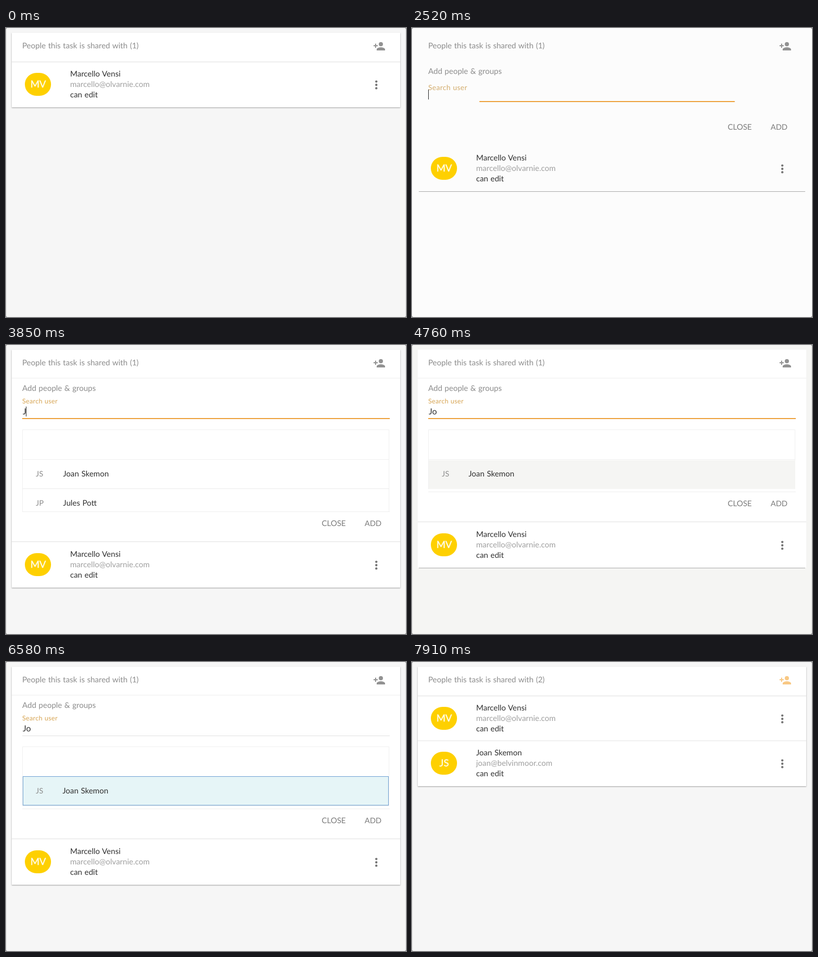
An HTML page for the animation above (8 s loop, 764 by 554 pixels).

```html
<!DOCTYPE html>
<html lang="en">
<head>
<meta charset="utf-8">
<title>Task sharing</title>
<style>
  html, body { margin: 0; width: 100%; height: 100%; overflow: hidden; background: #f6f6f6; }
  svg { display: block; width: 764px; height: 554px; }
  text { font-family: Lato, "Open Sans", sans-serif; word-spacing: .7px; white-space: pre; text-rendering: geometricPrecision; }
  .card { filter: drop-shadow(0 1px 1px rgba(0, 0, 0, .36)); }
</style>
</head>
<body>
<svg id="stage" viewBox="0 0 764 554" xmlns="http://www.w3.org/2000/svg"></svg>
<script>
const LOOP = 8000, STEP = 70;
const T = { hover: 1050, open: 1260, leave: 1610, focus: 2450, typeJ: 3780, results: 3850,
            typeO: 4060, filter: 4270, rowHover: 4690, select: 6090, added: 6720, hover2: 7910 };
const OWNER = { initials: 'MV', name: 'Marcello Vensi', mail: 'marcello@olvarnie.com' };
const GUEST = { initials: 'JS', name: 'Joan Skemon', mail: 'joan@belvinmoor.com' };
const OTHER = { initials: 'JP', name: 'Jules Pott' };
const DARK = '#303030', GREY = '#8c8c8c';
const PERSON = 'M15 12a4 4 0 1 0 0-8 4 4 0 0 0 0 8zM6 10V7H4v3H1v2h3v3h2v-3h3v-2zM15 14c-2.67 0-8 1.34-8 4v2h16v-2c0-2.66-5.33-4-8-4z';

const stage = document.getElementById('stage');
const clamp = v => Math.max(0, Math.min(1, v));
const mix = (a, b, k) => `rgb(${a.map((v, i) => Math.round(v + (b[i] - v) * k))})`;

// Cubic Bezier easing (.25, .8, .25, 1)
function ease(x) {
  let lo = 0, hi = 1;
  for (let i = 0; i < 24; i++) {
    const s = (lo + hi) / 2;
    if (.75 * s * (1 - s) + s ** 3 < x) lo = s; else hi = s;
  }
  const s = lo, r = 1 - s;
  return 2.4 * r * r * s + 3 * r * s * s + s ** 3;
}

const text = (x, y, str, fill = DARK, size = 15, extra = '') =>
  `<text x="${x}" y="${y}" fill="${fill}" font-size="${size}" ${extra}>${str}</text>`;
const rect = (x, y, w, h, fill, extra = '') =>
  `<rect x="${x}" y="${y}" width="${w}" height="${h}" fill="${fill}" ${extra}/>`;

function person(dy, { initials, name, mail }) {
  const dots = [102.6, 109, 115.4].map(y => `<circle cx="707.3" cy="${y}" r="2.2" fill="#747474"/>`).join('');
  return `<g transform="translate(0 ${dy})">` +
    rect(36, 86, 50, 44, '#fed000', 'rx="22"') +
    text(61.5, 114, initials, '#fffbe6', 18.5, 'text-anchor="middle" stroke="#fffbe6" stroke-width=".5"') +
    text(122.5, 93, name) + text(122.5, 113, mail, '#a0a0a0') + text(122.5, 133, 'can edit') +
    dots + '</g>';
}

function iconTint(t) {
  let k = 0;
  if (t >= T.hover2) k = 1;
  else if (t < T.leave) k = clamp((t - T.hover + STEP) / (2 * STEP));
  else k = clamp(1 - (t - T.leave + STEP) / (2 * STEP));
  return mix([146, 146, 146], [248, 200, 132], k);
}

function caret(t) {
  if (t < T.focus || t >= T.select) return '';
  const start = t >= T.typeO ? T.typeO : t >= T.typeJ ? T.typeJ : T.focus;
  if (Math.floor((t - start) / 490) % 2) return '';
  const x = t >= T.typeO ? 49 : t >= T.typeJ ? 38 : 31;
  return rect(x, 118, 1, 19, '#222');
}

function field(t) {
  const p = t < T.focus ? 0 : ease(clamp((t - T.focus + 22) / 400));
  const scale = 1 - .24 * p;
  const tint = p ? mix([205, 190, 165], [214, 163, 80], p) : '#cdcdcd';
  let out = `<g transform="translate(31 ${133 - 21 * p}) scale(${scale})">` +
    text(0, 0, 'Search user', tint, 16.5, 'style="letter-spacing:.4px"') + '</g>';
  if (t >= T.results) out += rect(31, 141, 702, 1, '#e0e0e0');
  if (p) {
    const x1 = 31 + 297 * (1 - p), x2 = 733 - 354 * (1 - p);
    const fade = 1 - clamp((t - T.select) / 350);
    out += rect(x1, 140, x2 - x1, 2, '#eda03a', `opacity="${fade}"`);
  }
  const typed = t >= T.typeO ? 'Jo' : t >= T.typeJ ? 'J' : '';
  return out + text(32, 133, typed, DARK, 16) + caret(t);
}

function results(t) {
  const one = t >= T.filter, end = one ? 276 : 319;
  let out = `<path d="M31.5 ${end}V162.5H731.5V${end}" fill="none" stroke="#efefef"/>` +
    rect(31, 219, 701, 1, '#efefef') + rect(31, 275, 701, 1, '#ebebeb') +
    rect(31, one ? 281 : 319, 702, 1, '#eeeeee');
  if (t >= T.select) out += rect(32.5, 219.5, 698, 55, '#e6f5f7', 'stroke="#6c9fd2"');
  else if (t >= T.rowHover) out += rect(32, 221, 700, 55, '#f5f5f3');
  const x = one ? 108 : 109;
  out += text(57, 252, GUEST.initials, GREY, 14.5) + text(x, 252, GUEST.name);
  if (!one) out += text(57, 308, OTHER.initials, GREY, 14.5) + text(x, 308, OTHER.name);
  return out;
}

function draw(t) {
  const open = t >= T.open && t < T.added;
  const pale = open && t < T.results;
  const flat = t >= T.filter && t < T.select;
  const dy = !open ? 0 : pale ? 161 : t < T.filter ? 313 : 275;
  const two = t >= T.added;
  const bottom = 152 + dy + (two ? 86 : 0);

  let out = rect(0, 0, 764, 554, pale ? '#fcfcfc' : flat ? '#f5f5f3' : '#f6f6f6');
  out += '<path d="M0 2V0H2M762 0H764V2M0 552V554H2M762 554H764V552" fill="none" stroke="#8a8a8a"/>';
  if (!pale) {
    out += rect(0, 2, 1, 550, '#e2e2e2') + rect(763, 2, 1, 550, '#e2e2e2');
    out += rect(11, 9, 742, bottom - 9, '#fff', flat ? '' : 'class="card"');
    out += open ? rect(11, 63, 742, 1, '#ededed') + rect(11, 63 + dy, 742, 2, '#eeeeee')
                : rect(11, 64, 742, 2, '#eeeeee');
    if (two) out += rect(11, 150, 742, 2, '#f0f0f0');
  }
  if (pale) out += rect(13, 313, 738, t < T.focus ? 1.6 : 1, '#a8a8a8');
  if (flat) out += rect(13, 427, 738, 1, '#a8a8a8');

  out += text(31, 39, `People this task is shared with (${two ? 2 : 1})`, GREY);
  out += `<path transform="translate(701 23)" d="${PERSON}" fill="${iconTint(t)}"/>`;
  if (open) {
    out += text(31, 88, 'Add people &amp; groups', GREY) + field(t);
    if (t >= T.results) out += results(t);
    out += text(603, dy + 34, 'CLOSE', '#7c7c7c', 15) + text(685, dy + 34, 'ADD', '#7c7c7c', 14.6);
  }
  out += person(dy, OWNER);
  if (two) out += person(86, GUEST);
  stage.innerHTML = out;
}

let last = -1;
const begin = performance.now();
function tick() {
  const t = Math.floor(((performance.now() - begin) % LOOP) / STEP) * STEP;
  if (t !== last) draw(last = t);
  requestAnimationFrame(tick);
}
tick();
</script>
</body>
</html>
```
